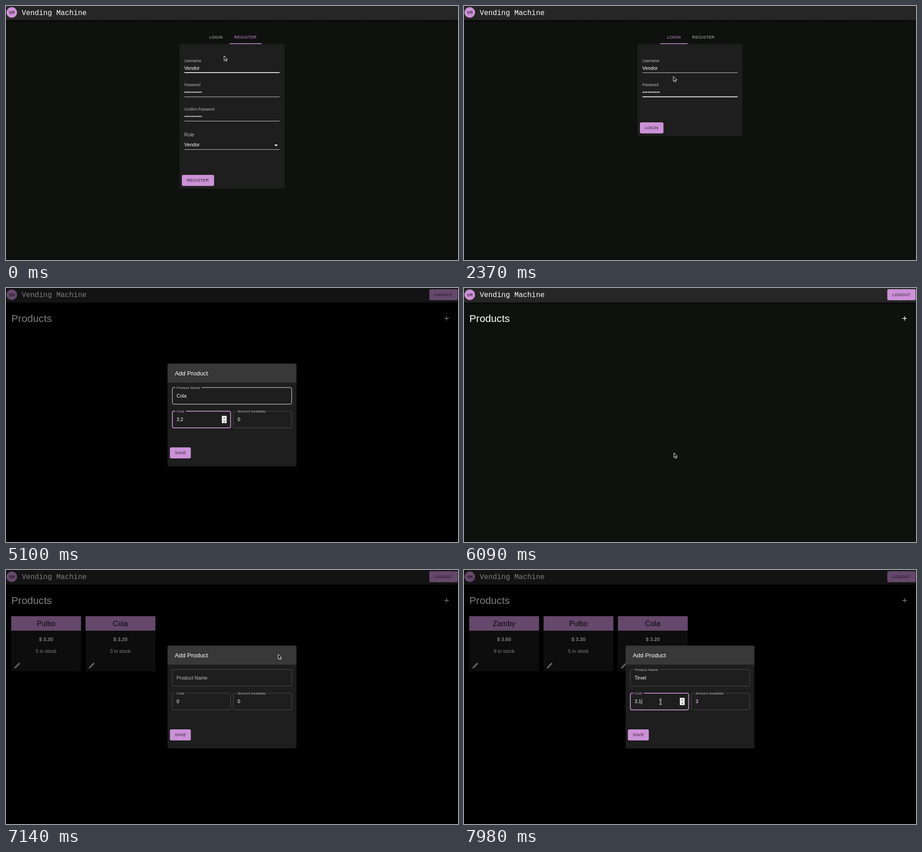
An HTML page for the animation above (8000 ms loop, 997 by 561 pixels).

```html
<!DOCTYPE html>
<html lang="en">
<head>
<meta charset="utf-8">
<title>Vending Machine</title>
<style>
  html, body { margin: 0; width: 100%; height: 100%; overflow: hidden; background: #0f110f; }
  svg { display: block; }
  #stage { width: 100vw; height: 100vh; }
  text { font-family: "Liberation Sans", Arial, Helvetica, sans-serif; white-space: pre; }
  .mono { font-family: "Liberation Mono", "Courier New", monospace; }
  .caps { letter-spacing: .02857em; }
</style>
</head>
<body>
<svg id="stage" viewBox="0 0 997 561" preserveAspectRatio="none"></svg>
<script>
const LOOP = 8000;
const PURPLE = '#cc91d7', DEEP = '#ab47bc', PAPER = '#1e1e1e', SOFT = '#bababa';
const USER = 'Vendor';
const SWITCH = 1720, SIGNED_IN = 2580;
const stage = document.getElementById('stage');

// Mouse path: time, x, y
const path = [
  [960, 481, 110], [1380, 418, 382], [1560, 418, 382], [1680, 463, 67], [1740, 463, 67],
  [1870, 470, 137], [2340, 470, 137], [2470, 413, 267], [2590, 413, 267], [2820, 973.5, 74],
  [3340, 973.5, 74], [3660, 500, 240], [5370, 500, 240], [5640, 384, 362], [5760, 384, 362],
  [6090, 463, 364], [6300, 463, 364], [6450, 973, 71], [6490, 973, 71], [6630, 500, 238],
  [6862, 500, 238], [6885, 384, 362], [6910, 384, 362], [6985, 973, 71], [7010, 973, 71],
  [7140, 600.5, 186], [7200, 500, 238], [7420, 500, 238], [7445, 384, 362], [7470, 384, 362],
  [7560, 973, 71], [7580, 973, 71], [7700, 500, 238], [7890, 500, 238], [7915, 433.5, 291]
];
const hidden = [[1900, 2330], [3900, 5360], [6680, 6862], [7230, 7420], [7715, 7912]];

// Each field: text, focus time, first key time, ms per key
const rounds = [
  { open: 3180, fade: 170, close: 5700, out: 150,
    name: ['Cola', 3690, 3900, 90], cost: ['3.2', 4380, 4890, 45], stock: ['3', 5130, 5340, 30] },
  { open: 6470, fade: 110, close: 6895, out: 50,
    name: ['pulbo', 6640, 6680, 25], cost: ['3.3', 6800, 6810, 12], stock: ['5', 6845, 6855, 10] },
  { open: 7005, fade: 90, close: 7460, out: 50,
    name: ['Zamby', 7210, 7230, 20], cost: ['3.6', 7335, 7345, 12], stock: ['9', 7395, 7405, 10] },
  { open: 7570, fade: 90, close: 9000, out: 50,
    name: ['Tirvel', 7700, 7712, 13], cost: ['3.1', 7915, 7950, 15], stock: ['3', 7800, 7820, 10] }
];
const products = [
  [6120, 'Cola', '3.20', 3], [6950, 'Pulbo', '3.30', 5], [7500, 'Zamby', '3.60', 9]
];

const clamp = v => Math.max(0, Math.min(1, v));
const smooth = v => { v = clamp(v); return v * v * (3 - 2 * v); };
const lerp = (a, b, k) => a + (b - a) * k;

const rect = (x, y, w, h, fill, r = 0, extra = '') =>
  `<rect x="${x}" y="${y}" width="${w}" height="${h}" rx="${r}" fill="${fill}" ${extra}/>`;
const text = (x, y, s, size, fill = '#fff', extra = '') =>
  `<text x="${x}" y="${y}" font-size="${size}" fill="${fill}" ${extra}>${s}</text>`;
const circle = (x, y, r, fill, extra = '') => `<circle cx="${x}" cy="${y}" r="${r}" fill="${fill}" ${extra}/>`;
const shape = (d, fill, extra = '') => `<path d="${d}" fill="${fill}" ${extra}/>`;
const CAPS = 'class="caps"', MID = 'text-anchor="middle"';

const DEFS = `<defs>
  <linearGradient id="drop" x2="0" y2="1"><stop stop-color="#000" stop-opacity=".6"/><stop offset="1" stop-opacity="0"/></linearGradient>
  <filter id="blur" x="-20%" y="-20%" width="140%" height="140%"><feGaussianBlur stdDeviation="3"/></filter>
</defs>`;

function mouseAt(t) {
  let i = path.findIndex(p => p[0] > t);
  if (i === 0) i = 1;
  if (i < 0) return { x: path.at(-1)[1], y: path.at(-1)[2] };
  const [t0, x0, y0] = path[i - 1], [t1, x1, y1] = path[i];
  const k = smooth((t - t0) / (t1 - t0));
  return { x: lerp(x0, x1, k), y: lerp(y0, y1, k) };
}

const over = (m, x, y, w, h) => m.x >= x && m.x <= x + w && m.y >= y && m.y <= y + h;

function typed([s, , start, step], t) {
  return s.slice(0, Math.max(0, Math.floor((t - start) / step + 1e-6) + 1));
}

// The caret shows shortly after focus and after each key
function caretOn([s, focus, start, step], t) {
  const end = start + (s.length - 1) * step;
  const last = t < start ? focus : Math.min(t, end);
  return t >= focus && t - last < 90;
}

const ruler = document.createElement('canvas').getContext('2d');
function widthOf(s) {
  ruler.font = '10.7px "Liberation Sans", Arial, Helvetica, sans-serif';
  return ruler.measureText(s).width;
}
const caret = (x, y) => rect(x + .6, y - 9.5, .9, 12, '#fff');

function button(x, y, w, label, m) {
  const hot = over(m, x, y, w, 24.5);
  return rect(x, y + 1.5, w, 24.5, '#000', 3.3, 'opacity=".35"') +
    rect(x, y, w, 24.5, hot ? DEEP : PURPLE, 3.3) +
    text(x + 10.7, y + 15.4, label, 9.2, 'rgba(0,0,0,.8)', CAPS);
}

function ripple(t, t0, x, y, w, h, cx, cy, fill) {
  const k = (t - t0) / 150;
  if (k < 0 || k > 1) return '';
  return `<svg x="${x}" y="${y}" width="${w}" height="${h}">` +
    circle(cx - x, cy - y, w * smooth(k * 1.4), fill, `opacity="${.3 * (1 - k)}"`) + '</svg>';
}

function header(dy) {
  return rect(0, 31 + dy, 997, 6, 'url(#drop)') + rect(0, 0, 997, 31 + dy, '#262626') +
    circle(12.7, 14.2 + dy * .7, 11.6, PURPLE) +
    text(12.8, 17.8 + dy * .7, 'VM', 10.4, '#201522', 'class="mono" text-anchor="middle"') +
    text(34.7, 19.5 + dy * .6, 'Vending Machine', 15.9, '#fff', 'class="mono"');
}

function lineInput(y, label, value, thick) {
  const empty = value === '';
  return text(393.3, empty ? y - 6.8 : y - 23.7, label, empty ? 10.7 : 8.15, SOFT) + value +
    rect(393.5, y - (thick ? 1 : .5), 210, thick ? 1.7 : 1, thick ? '#fff' : '#d0d0d0');
}

const dots = (y, n) => Array.from({ length: n }, (_, i) => circle(395.3 + i * 3.86, y, 1.35, '#fff')).join('');

function authPage(t, m) {
  const login = t >= SWITCH;
  const k = smooth((t - SWITCH) / 80);
  let s = header(0) + rect(383, 84, 231, login ? 203 : 319, PAPER, 2);
  s += text(448, 71.6, 'LOGIN', 9.3, login ? PURPLE : SOFT, CAPS) +
    text(503.2, 71.6, 'REGISTER', 9.3, login ? SOFT : PURPLE, CAPS) +
    rect(lerp(493, 433, k), 82.4, lerp(71, 60, k), 1.6, PURPLE) +
    ripple(t, 1680, 433, 44, 60, 40, 463, 67, PURPLE);
  if (login) {
    const user = [USER, 1880, 1920, 32], pass = ['0123456789', 2120, 2140, 18];
    const name = typed(user, t), secret = typed(pass, t).length;
    const inPass = t >= 2120;
    s += lineInput(147.3, 'Username', name && text(393.3, 140.6, name, 10.7), t >= 1880 && !inPass) +
      lineInput(200.7, 'Password', dots(190.3, secret), inPass && t < 2480) +
      button(388, 257, 52, 'LOGIN', m) + ripple(t, 2480, 388, 257, 52, 24.5, 413, 267, '#fff');
    if (!inPass && caretOn(user, t)) s += caret(393.3 + widthOf(name), 140.6);
    return s;
  }
  return s + lineInput(147.3, 'Username', text(393.3, 140.6, USER, 10.7), t < 1400) +
    lineInput(200.7, 'Password', dots(190.3, 10)) +
    lineInput(254.2, 'Confirm Password', dots(243.8, 10)) +
    text(393.3, 287.7, 'Role', 10.7, SOFT) + text(393.3, 310.4, USER, 10.7) +
    rect(393.5, 316.5, 210, 1, '#d0d0d0') + shape('M592 306h7.6l-3.8 4z', '#fff') +
    button(388, 373, 71, 'REGISTER', m) + ripple(t, 1390, 388, 373, 71, 24.5, 418, 382, '#fff');
}

const PENCIL = 'M14.06 9.02l.92.92L5.92 19H5v-.92l9.06-9.06M17.66 3c-.25 0-.51.1-.7.29l-1.83 1.83 3.75 3.75 ' +
  '1.83-1.83c.39-.39.39-1.02 0-1.41l-2.34-2.34c-.2-.2-.45-.29-.71-.29zm-3.6 3.19L3 17.25V21h3.75L17.81 9.94z';

function card([, name, price, stock], i) {
  return `<g transform="translate(${i * 164} 0)">` +
    rect(11.5, 102, 154, 122, '#1b1b1b', 2) + rect(11.5, 102, 154, 32, PURPLE) +
    text(88.4, 123.7, name, 16.1, '#100c12', MID) +
    text(88.4, 156.6, '$ ' + price, 11.1, '#fff', MID + ' font-weight="700"') +
    text(88.4, 183, stock + ' in stock', 10.8, '#fff', MID) +
    shape(PENCIL, '#fff', 'transform="translate(17 203) scale(.665)"') + '</g>';
}

function productPage(t, m, p) {
  let s = header(1) + rect(933.7, 2.5, 62.5, 24.5, PURPLE, 3.3) +
    text(944.6, 18, 'LOGOUT', 9.1, 'rgba(0,0,0,.8)', CAPS) +
    text(11.8, 74.5, 'Products', 22.6);
  if (over(m, 963, 58, 18, 18) && p < .9) s += circle(971.8, 67.2, 8.6, '#fff', 'opacity=".13"');
  for (const t0 of [3060, 6445, 6980, 7550]) s += ripple(t, t0, 963, 58, 18, 18, 972, 67, '#fff');
  s += shape('M967 67.2h9.7M971.85 62.4v9.7', 'none', 'stroke="#fff" stroke-width="1.4"');
  return s + products.filter(c => c[0] <= t).reverse().map(card).join('');
}

function outlined(x, y, w, label, gap, field, t, m, focused, zero) {
  let value = typed(field, t);
  const caretX = x + 9.3 + widthOf(value || zero);
  const floats = zero || value || focused;
  const edge = focused ? PURPLE : over(m, x, y, w, 37) ? '#f4f4f4' : '#505050';
  const sw = focused ? 1.7 : 1;
  let s = rect(x, y, w, 36.8, 'none', 3.3, `stroke="${edge}" stroke-width="${sw}"`);
  if (floats) {
    s += rect(x + 6.5, y - 1.5, gap, 3, PAPER) +
      text(x + 9.3, y + 2.8, label, 8.1, focused ? PURPLE : SOFT);
  } else s += text(x + 9.3, y + 21.8, label, 10.7, SOFT);
  s += text(x + 9.3, y + 22.2, value || zero, 10.7);
  if (focused && caretOn(field, t)) s += caret(caretX, y + 22.2);
  if (zero && (focused || over(m, x, y, w, 37))) {
    s += rect(x + w - 19.3, y + 10.3, 10.6, 16, '#f2f2f2') +
      shape(`M${x + w - 16} ${y + 16}l2-2.6 2 2.6zm0 5.6h4l-2 2.6z`, '#333') +
      rect(x + w - 19.3, y + 18, 10.6, .6, '#bbb');
  }
  return s;
}

function dialog(t, m, r, p) {
  const fields = [r.name, r.cost, r.stock];
  const active = fields.filter(f => f[1] <= t).sort((a, b) => b[1] - a[1])[0];
  const box = (x, y, w, label, gap, f, zero) => outlined(x, y, w, label, gap, f, t, m, f === active, zero);
  return rect(0, 0, 997, 561, '#000', 0, `opacity="${p / 2}"`) + `<g opacity="${p}">` +
    rect(361, 180, 275, 222, '#000', 12, 'filter="url(#blur)"') +
    rect(356.5, 167, 284, 227, PAPER, 3) +
    shape('M356.5 209v-39q0-3 3-3h278q3 0 3 3v39z', '#383838') +
    text(372.2, 192.6, 'Add Product', 13.3) +
    box(366.9, 219.8, 263.2, 'Product Name', 58, r.name, '') +
    box(366.9, 272.1, 128.5, 'Cost', 23.5, r.cost, '0') +
    box(501.4, 272.1, 128.6, 'Amount Available', 68.5, r.stock, '0') +
    button(361.5, 352, 46.2, 'SAVE', m) +
    ripple(t, r.close - 30, 361.5, 352, 46.2, 24.5, 384, 362, '#fff') + '</g>';
}

function pointer(t, m, p) {
  if (hidden.some(([a, b]) => t >= a && t < b)) return '';
  const hit = list => list.some(b => over(m, ...b));
  const modal = p > 0, auth = t < SIGNED_IN, login = t >= SWITCH;
  const hand = hit(modal ? [[361, 352, 47, 25]]
    : auth ? [[433, 44, 131, 40], login ? [388, 257, 52, 25] : [388, 373, 71, 25]]
    : [[963, 58, 18, 18]]);
  const beam = hit(modal ? [[367, 220, 263, 37], [367, 272, 109, 37], [501, 272, 109, 37]]
    : auth ? [[393, 128, 210, 20], [393, 182, 210, 20]].concat(login ? [] : [[393, 235, 210, 20]]) : []);
  const at = `transform="translate(${m.x} ${m.y})" stroke-linejoin="round"`;
  if (hand) return shape('M-1 .5q1-1.2 2 0l.5 4 .5-.8q1.2-.5 1.6.6 1.2-.4 1.5.6 1.3-.2 1.3 1l-.4 4-1.2 2.4h-4.6' +
    'L-3.400 8.200q-.6-1.5.8-1.6L-.6 8z', '#fff', at + ' stroke="#111" stroke-width=".8"');
  if (beam) {
    const d = 'M-2.300 -5.500Q0 -5.500 0 -4V4Q0 5.500 -2.300 5.500M2.300 -5.500Q0 -5.500 0 -4M0 4Q0 5.500 2.300 5.500M-1.300 1.500h2.600';
    return shape(d, 'none', at + ' stroke="#fff" stroke-width="2.4"') +
      shape(d, 'none', at + ' stroke="#111" stroke-width=".9"');
  }
  return shape('M0 0V10.800L2.400 8.600 4 12.300 6 11.400 4.400 7.800H7.700Z', '#111', at + ' stroke="#fff" stroke-width="1"');
}

function render(t) {
  const m = mouseAt(t);
  const r = rounds.find(q => t >= q.open && t < q.close + q.out);
  const p = r ? Math.min(smooth((t - r.open) / r.fade), 1 - smooth((t - r.close) / r.out)) : 0;
  // The page ground sinks to pure black behind the dialog
  const v = 16 * (1 - p ** 6) / (1 - p / 2);
  stage.innerHTML = DEFS + rect(0, 0, 997, 561, `rgb(${v * .95},${v * 1.08},${v * .92})`) +
    (t < SIGNED_IN ? authPage(t, m) : productPage(t, m, p)) +
    (r ? dialog(t, m, r, p) : '') + pointer(t, m, p);
}

const begin = performance.now();
function tick() {
  render((performance.now() - begin) % LOOP);
  requestAnimationFrame(tick);
}
tick();
</script>
</body>
</html>
```
